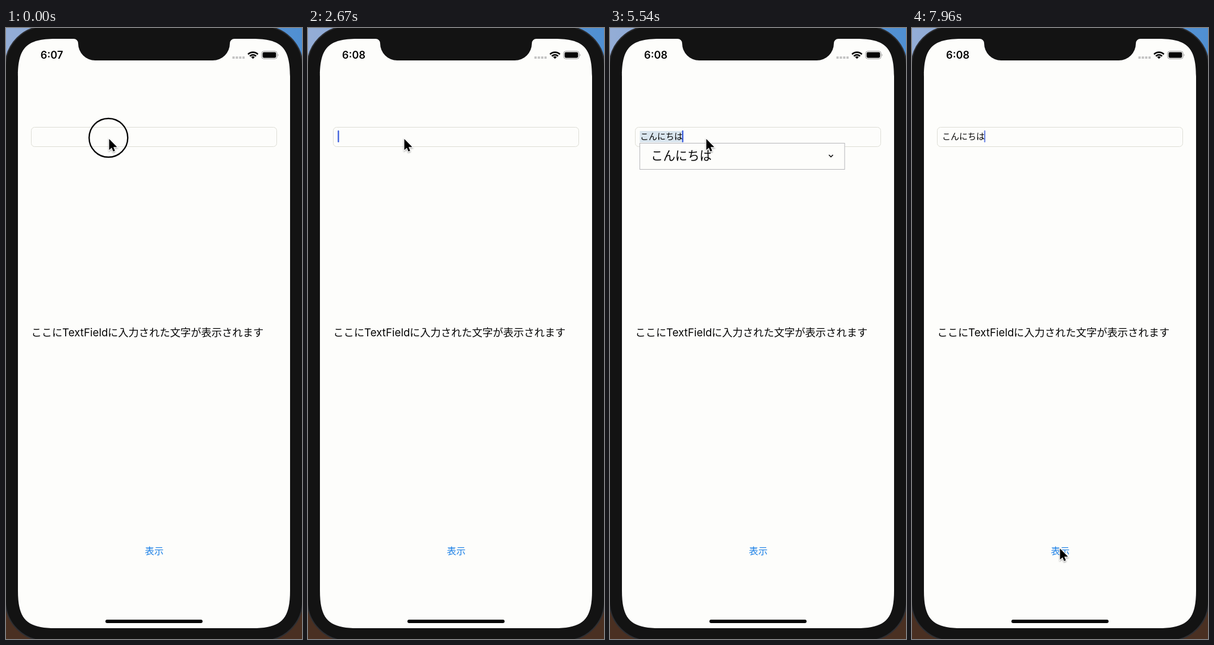
Animation of 521x1074 px, one loop 8000 ms. Source, as an HTML page:

```html
<!DOCTYPE html>
<html lang="ja">
<head>
<meta charset="utf-8">
<title>TextField</title>
<style>
  html, body { margin: 0; width: 100%; height: 100%; overflow: hidden; background: #131313; }
  svg { display: block; width: 521px; height: 1074px; }
  text { font-family: Inter, "Noto Sans CJK JP", "Noto Sans CJK", sans-serif; fill: #050505; }
  .ja { font-family: "Noto Sans CJK JP", "Noto Sans CJK", sans-serif; }
  .clock { font-size: 18.2px; font-weight: 600; text-anchor: middle; }
  .label { font-size: 18.3px; }
  .latin { font-size: 18.8px; }
  .button { font-size: 16.4px; fill: #1a7fe6; text-anchor: middle; }
  .input { font-size: 15px; }
  .choice { font-size: 21.4px; }
</style>
</head>
<body>
<svg viewBox="0 0 521 1074">
  <defs>
    <linearGradient id="sky">
      <stop offset="0" stop-color="#94add6"/>
      <stop offset="1" stop-color="#4f8fd2"/>
    </linearGradient>
    <filter id="shadow" x="-50%" y="-50%" width="200%" height="200%">
      <feDropShadow dx="0" dy="1.5" stdDeviation="1.2" flood-opacity=".4"/>
    </filter>
  </defs>

  <!-- wallpaper and phone body -->
  <rect width="521" height="537" fill="url(#sky)"/>
  <rect y="537" width="521" height="537" fill="#4a3022"/>
  <rect x="-1" y="-3" width="523" height="1080" rx="70" fill="#131313" stroke="#2e2f33" stroke-width="2"/>
  <path fill="#fdfdfb" d="M87 19H119A8 8 0 0 1 127 27A30 30 0 0 0 157 57H364A30 30 0 0 0 394 27
    A8 8 0 0 1 402 19H434C484.5 19 500 34.5 500 85V989C500 1039.5 484.5 1055 434 1055
    H87C36.5 1055 21 1039.5 21 989V85C21 34.5 36.5 19 87 19Z"/>

  <!-- status bar -->
  <text class="clock" id="clock" x="80.6" y="54">6:07</text>
  <path d="M398.5 52H420" stroke="#c3c3c3" stroke-width="4" stroke-dasharray="4 1.9"/>
  <g fill="none" stroke="#050505" stroke-width="2.7">
    <path d="M426 46.2A12.6 12.6 0 0 1 443.4 46.2"/>
    <path d="M429.2 49.4A8 8 0 0 1 440.2 49.4"/>
  </g>
  <path d="M434.7 54.3L431.5 51.1A4.6 4.6 0 0 1 437.9 51.1Z" fill="#050505"/>
  <rect x="449.8" y="40.8" width="27.4" height="13.4" rx="4" fill="none" stroke="#999"/>
  <rect x="451.6" y="42.6" width="23.8" height="9.8" rx="2.4" fill="#050505"/>
  <path d="M478.6 45.2Q480.6 47.5 478.6 49.8Z" fill="#999"/>

  <!-- page -->
  <rect x="44.5" y="174.5" width="432" height="34" rx="6" fill="#fdfdfb" stroke="#dcdcd4"/>
  <text class="label" y="542"><tspan class="ja" x="44.5">ここに</tspan><tspan class="latin" x="99">TextField</tspan><tspan class="ja" x="179">に入力された文字が表示されます</tspan></text>
  <text class="button ja" x="261" y="925">表示</text>
  <rect x="175" y="1040" width="171" height="6" rx="3" fill="#050505"/>

  <!-- text input -->
  <rect id="mark" x="52.5" y="181" height="20" fill="#d9e5ee"/>
  <text class="input ja" id="input" x="53" y="196"></text>
  <rect id="caret" y="180" width="2.4" height="21" rx="1" fill="#3d5fdc"/>
  <g id="panel">
    <rect x="52.5" y="202.5" width="360.5" height="46" fill="#fdfdfb" stroke="#b4b4b8"/>
    <text class="choice ja" id="first" y="231.5"></text>
    <text class="choice ja" id="second" x="216" y="231.5"></text>
    <path d="M385.3 223L388.9 226.6L392.5 223" fill="none" stroke="#111" stroke-width="1.7"/>
  </g>

  <!-- pointer -->
  <circle id="ring" cx="180.3" cy="193" r="34" fill="none" stroke="#050505" stroke-width="2.4"/>
  <path id="pointer" d="M0 0V19.5L4.5 15.4L7.2 22L10.3 20.7L7.6 14.2H14Z" fill="#050505"
    stroke="#fff" stroke-width="2" paint-order="stroke" filter="url(#shadow)"/>
</svg>
<script>
  const LOOP = 8000, FOCUS = 200, COMMIT = 5990;
  const $ = id => document.getElementById(id);
  const hello = 'こんにちは', evening = 'こんばんは';

  // start time, text, candidates
  const typing = [
    [0, ''],
    [3880, 'k'],
    [3980, 'こ', '子', evening],
    [4240, 'こn', '子', evening],
    [4400, 'こん', '今', evening],
    [4600, 'こんn', '今', evening],
    [4720, 'こんに', hello],
    [4900, 'こんにt', hello],
    [5020, 'こんにち', hello],
    [5200, 'こんにちh', hello],
    [5320, hello, hello],
    [COMMIT, hello]
  ];

  const clamp = v => Math.min(1, Math.max(0, v));
  const ease = (t, from, to) => {
    const p = clamp((t - from) / (to - from));
    return p * p * (3 - 2 * p);
  };
  const show = (id, on) => $(id).style.display = on ? '' : 'none';
  const setText = (id, value) => {
    if ($(id).textContent !== value) $(id).textContent = value;
  };

  function blink(t) {
    const p = t % 1000 / 1000;
    return p < .9 ? clamp((.83 - p) / .16) : clamp((p - .9) / .1);
  }

  function draw(t) {
    const [start, text, first = '', second = ''] = typing.findLast(s => s[0] <= t);
    const composing = start > 0 && t < COMMIT;
    const width = [...text].reduce((sum, c) => sum + (c < '\u0100' ? 8.5 : 15), 0);

    setText('clock', t < 1750 ? '6:07' : '6:08');
    setText('input', text);
    setText('first', first);
    setText('second', second);
    $('first').setAttribute('x', first.length > 1 ? 72 : 102.5);
    $('mark').setAttribute('width', composing ? width + 1 : 0);
    show('panel', first);

    $('caret').setAttribute('x', text ? 51.8 + width : 52.3);
    $('caret').style.opacity = t < FOCUS ? 0
      : composing ? 1
      : blink(t - (t < COMMIT ? FOCUS : COMMIT));

    show('ring', t < 160);
    const settle = ease(t, 200, 650), leave = ease(t, 7400, 7900);
    const x = 181.5 - 12 * settle + 91 * leave;
    const y = 195 + 720 * leave;
    $('pointer').setAttribute('transform', `translate(${x} ${y})`);
  }

  const begin = performance.now();
  function frame() {
    draw((performance.now() - begin) % LOOP);
    requestAnimationFrame(frame);
  }
  frame();
</script>
</body>
</html>
```
